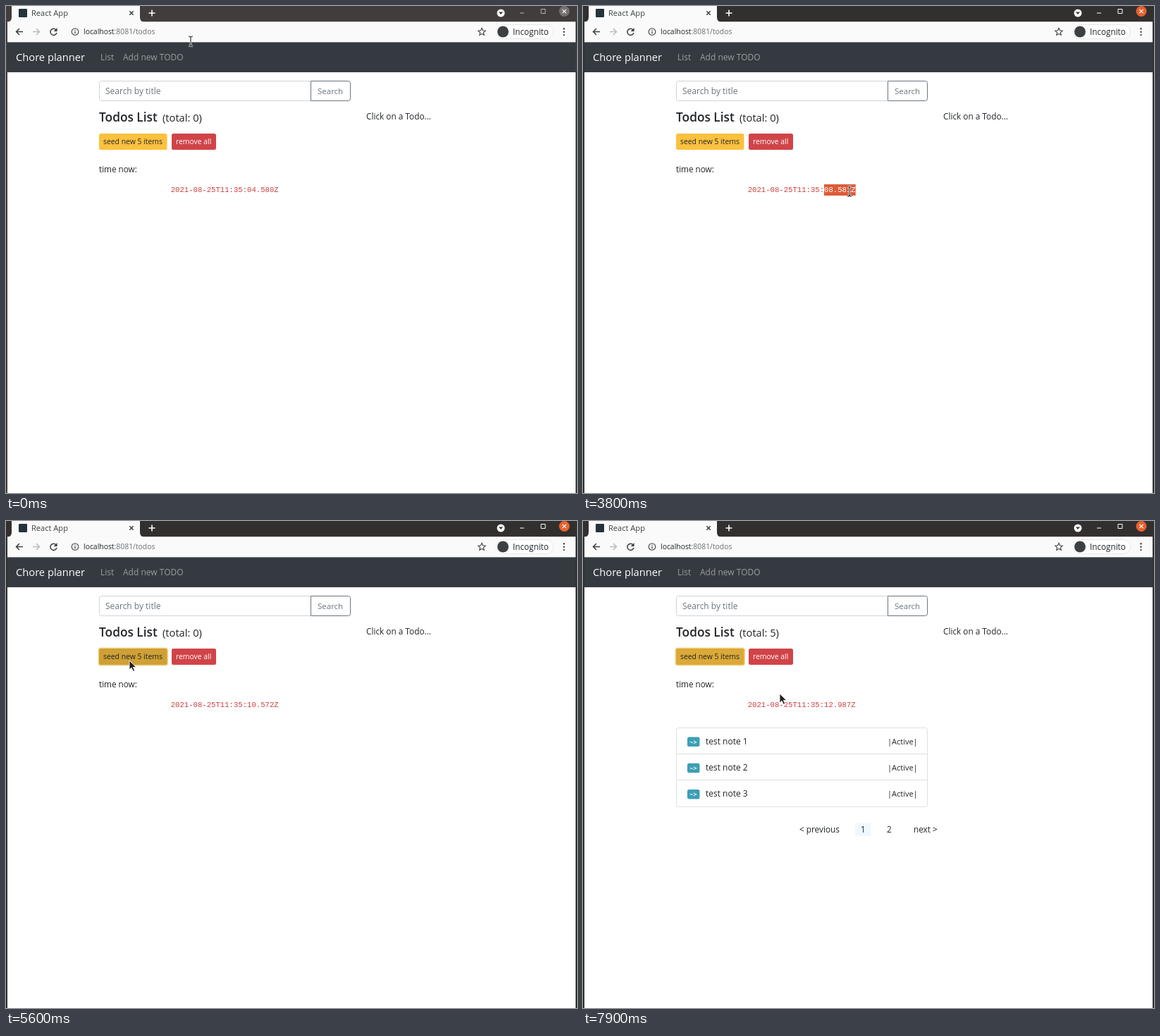
An HTML page that plays this animation: 810x691 px, repeating every 8 s.

```html
<!DOCTYPE html>
<html lang="en">
<head>
<meta charset="utf-8">
<title>Todos</title>
<style>
html, body { margin: 0; width: 100%; height: 100%; overflow: hidden; background: #fff; }
svg { display: block; width: 810px; height: 691px; font: 12px "Open Sans", "Noto Sans", sans-serif; fill: #212529; }
.line { fill: none; stroke: #3c4043; stroke-width: 1.5; }
.border { fill: #fff; stroke: #dcdfe2; }
.tab { font-size: 11.1px; }
.url { font-size: 10.4px; }
.small { font-size: 10.4px; }
.muted { fill: #6c757d; }
.code { font: 10.64px "Liberation Mono", monospace; fill: #cb4140; white-space: pre; }
.json { font: 9.88px "DejaVu Sans Mono", monospace; fill: #000; }
.white { fill: #fff; }
</style>
</head>
<body>
<svg viewBox="0 0 810 691">
  <defs>
    <linearGradient id="fade" gradientUnits="userSpaceOnUse" x1="217" x2="240" y1="0" y2="0">
      <stop offset=".5" stop-color="#d8d6d5"/><stop offset="1" stop-color="#d8d6d5" stop-opacity="0"/>
    </linearGradient>
    <path id="cross" d="M-2.7-2.7 2.7 2.7M2.7-2.7-2.7 2.7"/>
  </defs>
  <rect id="chrome" width="810" height="691"/>
  <rect x="2" y="22.5" width="806" height="668.5" fill="#fff"/>

  <!-- Tab strip -->
  <path id="miniTab" d="M191 22.5V0H255Q261 0 261 6V22.5Z" fill="#403d3d"/>
  <path id="activeTab" d="M2 23Q8 22 8 16V0H190V16Q190 22 196 23Z" fill="#fafafa"/>
  <rect x="18" y="4" width="12" height="12" rx="1" fill="#23343b"/>
  <text id="title1" class="tab" x="36" y="14">React App</text>
  <use id="close1" href="#cross" x="178" y="10" stroke-width="1.5"/>
  <g id="tab2">
    <circle id="globe" cx="205" cy="10" r="5.5"/>
    <path id="land" d="M200.5 8Q202 5 206 5.5L205 8 203 10 201 10ZM206 10 209 9Q210 12 206 14L205 12Z"/>
    <text id="title2" class="tab" x="217" y="14"></text>
    <use id="close2" href="#cross" y="10" stroke-width="1.5"/>
  </g>
  <path id="plus" d="M-4.5 10H4.5M0 5.5V14.5" stroke="#fff" stroke-width="1.6"/>

  <!-- Window buttons -->
  <circle cx="702" cy="10" r="5.5" fill="#fff"/>
  <path d="M699 8.5H705L702 12Z" fill="#35302f"/>
  <path id="winIcons" d="M729 10H735M759 4.5H765V10.5H759Z" fill="none"/>
  <circle id="winClose" cx="792" cy="7.5" r="7.5"/>
  <use href="#cross" x="792" y="7.5" stroke="#fff" stroke-width="1.2"/>

  <!-- Toolbar -->
  <rect x="2" y="22.5" width="806" height="29" fill="#fafafa"/>
  <path d="M2 51.5H808" stroke="#d9d8d8"/>
  <path id="back" class="line" d="M24 36.5H14.5M19 32 14.5 36.5 19 41"/>
  <path class="line" d="M38 36.5H47.5M43 32 47.5 36.5 43 41" style="stroke:#b9bbbd"/>
  <path class="line" d="M71 33.7A4.6 4.6 0 1 0 72 38"/>
  <path d="M72.6 31V36H67.6Z" fill="#3c4043"/>
  <circle class="line" cx="98" cy="36.5" r="4.8" style="stroke-width:1.1"/>
  <path d="M98 33.5V34.7M98 35.8V39.3" stroke="#3c4043" stroke-width="1.2"/>
  <text class="url" x="110" y="40">localhost<tspan id="path" fill="#6b6f73"></tspan></text>
  <path class="line" style="stroke-width:1.1" d="M675 31.3 676.5 34.8 680.2 35.1 677.4 37.6 678.2 41.3 675 39.4 671.8 41.3 672.6 37.6 669.8 35.1 673.5 34.8Z"/>
  <rect x="695.5" y="26.5" width="81" height="20" rx="10" fill="#fff" stroke="#e7e8ea"/>
  <circle cx="705" cy="36.5" r="8" fill="#3c4043"/>
  <text x="719" y="40.5" font-size="11.7">Incognito</text>
  <g fill="#3c4043"><circle cx="791.5" cy="32.3" r="1.2"/><circle cx="791.5" cy="36.7" r="1.2"/><circle cx="791.5" cy="41.1" r="1.2"/></g>

  <g id="seedPage">
    <text class="json" x="8.5" y="71">{"status":200,"mgs":"Added"}</text>
  </g>

  <g id="todoPage">
    <rect x="2" y="51.5" width="806" height="42.5" fill="#343a40"/>
    <text class="white" x="14" y="78" font-size="14.7">Chore planner</text>
    <g fill="#9a9da0"><text x="134" y="77">List</text><text x="166" y="77">Add new TODO</text></g>

    <path d="M432.5 106.5H135.5Q132.5 106.5 132.5 109.5V131.5Q132.5 134.5 135.5 134.5H432.5" fill="#fff" stroke="#ced4da"/>
    <path d="M432.5 106.5H485.5Q488.5 106.5 488.5 109.5V131.5Q488.5 134.5 485.5 134.5H432.5Z" fill="#fff" stroke="#6c757d"/>
    <text class="muted" x="141" y="125">Search by title</text>
    <text class="muted" x="442" y="125" font-size="11.5">Search</text>
    <text x="132" y="164" font-size="17.3" font-weight="600">Todos List</text>
    <text id="total" x="222" y="164" font-size="14.7"></text>
    <text x="511" y="161" font-size="11.8">Click on a Todo...</text>

    <rect id="ring" x="130.5" y="179.5" width="99.5" height="26" rx="4" fill="#f2d58a"/>
    <rect id="seedButton" x="132" y="181" width="96.5" height="23" rx="2.5"/>
    <text class="small" x="138" y="196">seed new 5 items</text>
    <rect x="235" y="181" width="63" height="23" rx="2.5" fill="#d04448"/>
    <text class="small white" x="241" y="196">remove all</text>

    <text x="132" y="236" font-size="11.7">time now:</text>
    <rect id="selection" y="253" height="16" fill="#dd5b37"/>
    <text class="code" x="233.7" y="263.5"><tspan id="plain"></tspan><tspan id="picked" class="white"></tspan></text>

    <g id="list">
      <rect class="border" x="132.5" y="293.5" width="356" height="112" rx="3"/>
      <path d="M133 330.5H488M133 367.5H488" stroke="#dcdfe2"/>
      <g id="rows"></g>
      <rect x="386" y="428.5" width="22" height="18.5" fill="#eff7ff"/>
      <g font-size="11.8">
        <text x="307" y="442">&lt; previous</text><text x="394" y="442">1</text>
        <text x="431" y="442">2</text><text x="469" y="442">next &gt;</text>
      </g>
    </g>
  </g>

  <path id="arrow" d="M0 0V13L3 10.3 5.4 15.2 7.6 14.2 5.3 9.4H9.6Z" fill="#222" stroke="#fff" stroke-width=".8"/>
  <g id="beam" fill="none">
    <path d="M-3-7Q0-7 0-5Q0-7 3-7M0-5V5M-3 7Q0 7 0 5Q0 7 3 7" stroke="#fff" stroke-width="2.6"/>
    <path d="M-3-7Q0-7 0-5Q0-7 3-7M0-5V5M-3 7Q0 7 0 5Q0 7 3 7" stroke="#222" stroke-width="1.1"/>
  </g>
</svg>
<script>
const $ = id => document.getElementById(id);
const set = (id, attrs) => { for (const k in attrs) $(id).setAttribute(k, attrs[k]); };
const show = (id, on) => { $(id).style.display = on ? '' : 'none'; };
const at = (t, steps) => steps.filter(s => s[0] <= t).pop()[1];

const LOOP = 8000, STEP = 100, CHAR = 6.385, TEXT_END = 386.7;
const SEED_OPEN = 5700, SEED_CLOSE = 6700;

// Pointer path: time, x, y
const pointer = [
  [0, 262, 50], [500, 330, 371], [900, 347, 240], [1100, 375, 267], [1200, 375, 267],
  [1400, 374, 269], [1800, 374, 269], [2100, 394, 266], [2400, 385, 262], [2500, 385, 262],
  [2900, 342, 262], [3100, 342, 262], [3300, 374, 310], [3400, 374, 310], [3700, 380, 264],
  [3800, 378, 263], [4100, 387, 268], [4300, 374, 268], [5200, 184, 209], [5400, 175, 198],
  [5600, 175, 198], [6100, 244, 7], [6600, 244, 7], [6700, 237, 14], [7500, 240, 315],
  [7800, 284, 262], [7900, 279, 245]
];
const stamps = [[0, '04.580'], [200, '06.580'], [2100, '08.581'], [4100, '10.572'], [SEED_CLOSE, '12.987']];
const seedFills = [[0, '#fcc13e'], [5300, '#e2ae3a'], [5400, '#cfa035'], [SEED_CLOSE, '#e8b33c'], [6800, '#dba937']];

$('rows').innerHTML = [1, 2, 3].map((n, i) => `<g transform="translate(0 ${i * 37.2})">
  <rect x="148" y="306.5" width="17.5" height="13.5" rx="2.5" fill="#3c9fb5"/>
  <text class="white" x="151.3" y="316.5" font-size="9" font-weight="700">~&gt;</text>
  <text x="174" y="317">test note ${n}</text>
  <text x="432" y="317" font-size="11">|Active|</text></g>`).join('');

function pointerAt(t) {
  const i = pointer.findIndex(p => p[0] > t);
  if (i < 0) return pointer[pointer.length - 1].slice(1);
  const [t0, x0, y0] = pointer[i - 1], [t1, x1, y1] = pointer[i];
  const k = (t - t0) / (t1 - t0);
  return [x0 + (x1 - x0) * k, y0 + (y1 - y0) * k];
}

function drawChrome(t, seedOpen) {
  const focused = t >= 300, closing = t === SEED_CLOSE;
  set('chrome', { fill: focused ? '#322f2f' : '#403d3c' });
  set('winClose', { fill: focused ? '#e8622f' : '#75716f' });
  set('winIcons', { stroke: focused ? '#fff' : '#b5b2b0' });
  set('activeTab', { transform: `translate(${seedOpen ? 182 : 0})` });
  set('title1', { fill: seedOpen ? '#e3e1e0' : '#3c4043' });
  set('close1', { stroke: seedOpen ? '#fff' : '#3c4043' });
  set('back', { style: `stroke:${seedOpen ? '#b9bbbd' : '#3c4043'}` });
  set('plus', { transform: `translate(${seedOpen ? 389 : closing ? 278 : 207})` });
  show('miniTab', closing);
  show('tab2', seedOpen || closing);
  set('globe', { fill: seedOpen ? '#5f6368' : '#77797b' });
  set('land', { fill: seedOpen ? '#fafafa' : '#403d3d' });
  set('title2', { fill: seedOpen ? '#3c4043' : 'url(#fade)' });
  $('title2').textContent = seedOpen ? 'localhost:8000/seed' : 'loca';
  set('close2', { x: seedOpen ? 360 : 249, stroke: seedOpen ? '#3c4043' : '#fff' });
  $('path').textContent = seedOpen ? ':8000/seed' : ':8081/todos';
}

function drawPage(t, x) {
  const seeded = t >= SEED_CLOSE;
  show('list', seeded);
  $('total').textContent = `(total: ${seeded ? 5 : 0})`;
  show('ring', t >= 5400);
  set('ring', { opacity: t === SEED_CLOSE ? .5 : 1 });
  set('seedButton', { fill: at(t, seedFills) });

  const stamp = `2021-08-25T11:35:${at(t, stamps)}Z`;
  let count = 0;
  if (t >= 2600 && t < 4100) count = t < 2900 ? Math.round((TEXT_END - x) / CHAR) : 7;
  const cut = stamp.length - count;
  $('plain').textContent = stamp.slice(0, cut);
  $('picked').textContent = stamp.slice(cut);
  set('selection', { x: TEXT_END - count * CHAR, width: count * CHAR });
}

function draw(t) {
  const seedOpen = t >= SEED_OPEN && t < SEED_CLOSE;
  const [x, y] = pointerAt(t);
  drawChrome(t, seedOpen);
  drawPage(t, x);
  show('todoPage', !seedOpen);
  show('seedPage', seedOpen);
  const beam = t < 100 || (t >= 2600 && t < 3200) || (t >= 3700 && t < 4000);
  show('beam', beam);
  show('arrow', !beam);
  set(beam ? 'beam' : 'arrow', { transform: `translate(${x} ${y})` });
}

const start = performance.now();
function frame() {
  const t = (performance.now() - start) % LOOP;
  draw(Math.floor(t / STEP) * STEP);
  requestAnimationFrame(frame);
}
frame();
</script>
</body>
</html>
```
